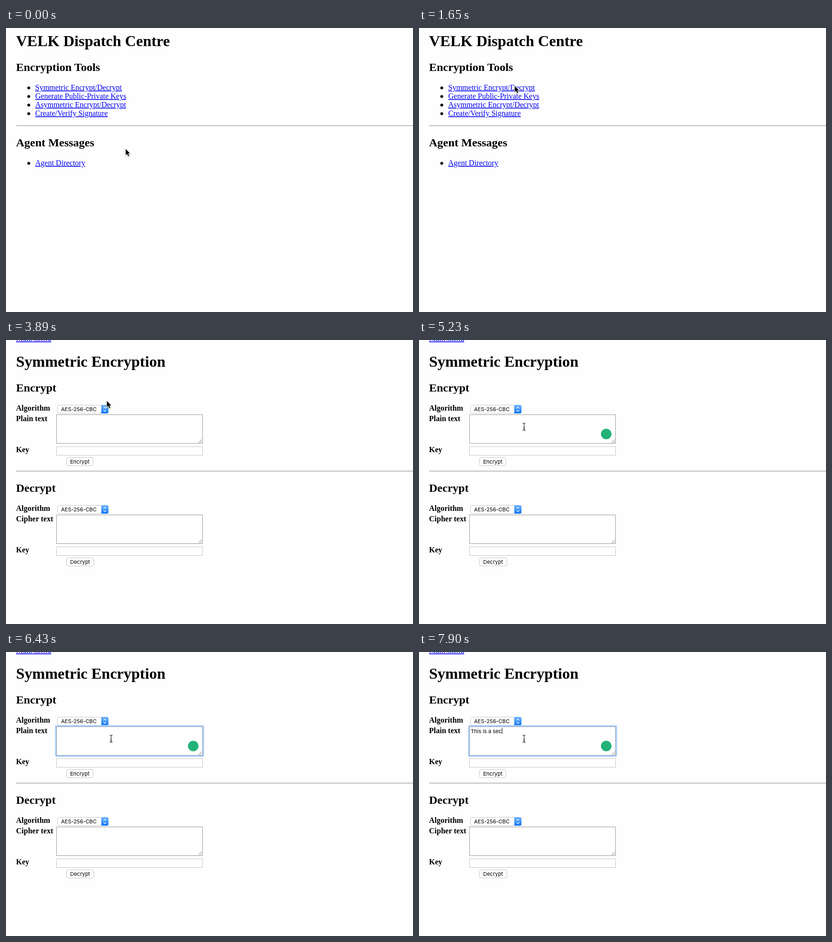
Animation of 850 by 595 pixels, one loop 8 s. Source, as an HTML page:

```html
<!DOCTYPE html>
<html lang="en">
<head>
<meta charset="utf-8">
<title>Message encryption demo</title>
<style>
  html, body { margin: 0; width: 100%; height: 100%; overflow: hidden; background: #fefefe; }
  svg { display: block; }
  text { font-family: "Liberation Serif", serif; font-size: 16px; white-space: pre; }
  .h1 { font-size: 32px; font-weight: bold; }
  .h2 { font-size: 24px; font-weight: bold; }
  .label { font-weight: bold; }
  .link { fill: #0000ee; text-decoration: underline; }
  .ui { font-family: Inter, sans-serif; font-size: 11px; }
</style>
</head>
<body>
<svg width="850" height="595" viewBox="0 0 850 595">
  <defs>
    <linearGradient id="blue" x2="0" y2="1">
      <stop stop-color="#6db4fb"/>
      <stop offset="1" stop-color="#1478f6"/>
    </linearGradient>
    <filter id="shadow" x="-50%" y="-50%" width="200%" height="200%">
      <feDropShadow dx="0" dy="1" stdDeviation="0.8" flood-opacity="0.35"/>
    </filter>
  </defs>
  <rect width="850" height="595" fill="#fefefe"/>
  <g id="menu"></g>
  <g id="form"></g>
  <g id="active">
    <rect id="ring" x="104" y="155" width="308" height="63" rx="1.5" fill="none" stroke="#b2d2f8" stroke-width="3.4"/>
    <rect id="ringEdge" x="105.5" y="156.5" width="305" height="60" fill="none" stroke="#8197b1"/>
    <text id="typed" class="ui" x="108" y="170"></text>
    <rect id="caret" y="159" width="1" height="13"/>
    <circle id="badge" cx="391" cy="197" r="11" fill="#23b277"/>
  </g>
  <g id="arrow" filter="url(#shadow)">
    <path d="M0 0V12.8L2.9 10L5.2 15.2L7.2 14.3L5 9.2H8.9Z" stroke="#fff" stroke-width="1.8" paint-order="stroke"/>
  </g>
  <g id="hand" filter="url(#shadow)" stroke="#000" fill="none">
    <path fill="#fff" d="M3.3 9.5L2.6 2.7A1.4 1.4 0 0 1 5.3 2L6.2 6.4A1.5 1.3 0 0 1 8.8 6.5A1.5 1.3 0 0 1 11.5 7.2A1.4 1.4 0 0 1 14 8.5V12L12.5 15V17.2H5.4V15.2L1 10.9A1.3 1.3 0 0 1 2.8 9Z"/>
    <path stroke-width=".8" d="M7 11.3V14.5M9 11.3V14.5M11 11.3V14.5"/>
  </g>
  <g id="beam" fill="none">
    <path id="beamHalo" stroke="#fff" stroke-width="2.4"/>
    <path id="beamLine" stroke="#111" stroke-width="1.1"/>
  </g>
</svg>
<script>
const LOOP = 8000;
const MESSAGE = "This is a sec";
const $ = id => document.getElementById(id);

const text = (cls, x, y, s) => `<text class="${cls}" x="${x}" y="${y}">${s}</text>`;
const box = (x, y, w, h, stroke, rx = 0) =>
  `<rect x="${x + .5}" y="${y + .5}" width="${w - 1}" height="${h - 1}" rx="${rx}" fill="#fff" stroke="${stroke}"/>`;
const rule = y =>
  `<rect x="21" y="${y}" width="829" height="1" fill="#999"/><rect x="21" y="${y + 1}" width="829" height="1" fill="#e6e6e6"/>`;
const item = (y, s) => `<circle cx="47.5" cy="${y - 4.5}" r="3"/>` + text("link", 61, y, s);

function cipherForm(y, title, source, buttonWidth) {
  return text("h2", 21, y, title)
    + text("label", 21, y + 40, "Algorithm")
    + text("label", 21, y + 62, source)
    + text("label", 21, y + 127, "Key")
    + box(107, y + 28, 107, 18, "#cbcbcb", 3.5)
    + `<path d="M199 ${y + 28}h11.5a3.5 3.5 0 0 1 3.5 3.5v11a3.5 3.5 0 0 1 -3.5 3.5h-11.5z" fill="url(#blue)"/>`
    + `<path d="M203.8 ${y + 35.3}l2.7 -2.7l2.7 2.7m-5.4 3.6l2.7 2.7l2.7 -2.7" fill="none" stroke="#fff" stroke-width="1.3"/>`
    + text("ui", 115, y + 41, "AES-256-CBC")
    + box(105, y + 48, 306, 61, "#999")
    + `<path d="M402 ${y + 107.5}l7 -7m-3 7l3 -3" stroke="#666" stroke-width=".9"/>`
    + box(105, y + 115, 306, 19, "#c6c6c6")
    + box(126, y + 138, buttonWidth, 18, "#c8c8c8", 3.5)
    + text("ui", 134, y + 151, title);
}

$("menu").innerHTML =
  text("h1", 21, 38, "VELK Dispatch Centre")
  + text("h2", 21, 90, "Encryption Tools")
  + ["Symmetric Encrypt/Decrypt", "Generate Public-Private Keys", "Asymmetric Encrypt/Decrypt", "Create/Verify Signature"]
      .map((s, i) => item(130 + 18 * i, s)).join("")
  + rule(204)
  + text("h2", 21, 248, "Agent Messages")
  + item(288, "Agent Directory");

$("form").innerHTML =
  text("link", 21, 2, "Main menu")
  + text("h1", 21, 56, "Symmetric Encryption")
  + cipherForm(108, "Encrypt", "Plain text", 56)
  + rule(274)
  + cipherForm(318, "Decrypt", "Cipher text", 58);

const beamPath = "M-3 -7.5Q0 -7.5 0 -5.5Q0 -7.5 3 -7.5M0 -5.5V5.5M-3 7.5Q0 7.5 0 5.5Q0 7.5 3 7.5M-1.7 2.5H1.7";
$("beamHalo").setAttribute("d", beamPath);
$("beamLine").setAttribute("d", beamPath);

// Pointer stops: time, shape, x, y
const pointer = [
  [0, "arrow", 250, 253.5],
  [600, "arrow", 247, 243],
  [750, "arrow", 238, 215],
  [900, "arrow", 223, 172],
  [1050, "arrow", 209, 131],
  [1200, "arrow", 200, 107],
  [1350, "arrow", 197.5, 102.5],
  [1500, "arrow", 198, 115.5],
  [1650, "arrow", 200, 121.5],
  [2540, "hand", 213, 126.5],
  [2690, "hand", 216.5, 127],
  [2840, "hand", 206.5, 127],
  [3890, "arrow", 210.7, 127.8],
  [4930, "beam", 214, 162],
  [5080, "beam", 218, 177],
  [5230, "beam", 219.5, 181.5]
];

// Typing stops: time, letters shown
const typing = [
  [0, 0], [6580, 1], [6730, 2], [6880, 4], [7030, 5], [7180, 7],
  [7330, 8], [7460, 10], [7610, 11], [7760, 12], [7900, 13]
];

const latest = (stops, t) => stops.findLast(s => s[0] <= t);
const show = (id, on) => $(id).setAttribute("display", on ? "inline" : "none");

function draw(t) {
  show("menu", t < 3890);
  show("form", t >= 3890);
  show("badge", t >= 5080);
  show("ring", t >= 5830);
  show("ringEdge", t >= 5830);

  const typed = MESSAGE.slice(0, latest(typing, t)[1]);
  if ($("typed").textContent !== typed) $("typed").textContent = typed;
  show("caret", t >= 5830 && (t < 6430 || t >= 6580));
  const width = typed ? $("typed").getComputedTextLength() : 0;
  $("caret").setAttribute("x", Math.round(108 + width));

  const [, shape, x, y] = latest(pointer, t);
  for (const id of ["arrow", "hand", "beam"]) show(id, id === shape);
  $(shape).setAttribute("transform", `translate(${x} ${y})`);
}

function tick(now) {
  draw(now % LOOP);
  requestAnimationFrame(tick);
}
draw(0);
requestAnimationFrame(tick);
</script>
</body>
</html>
```
